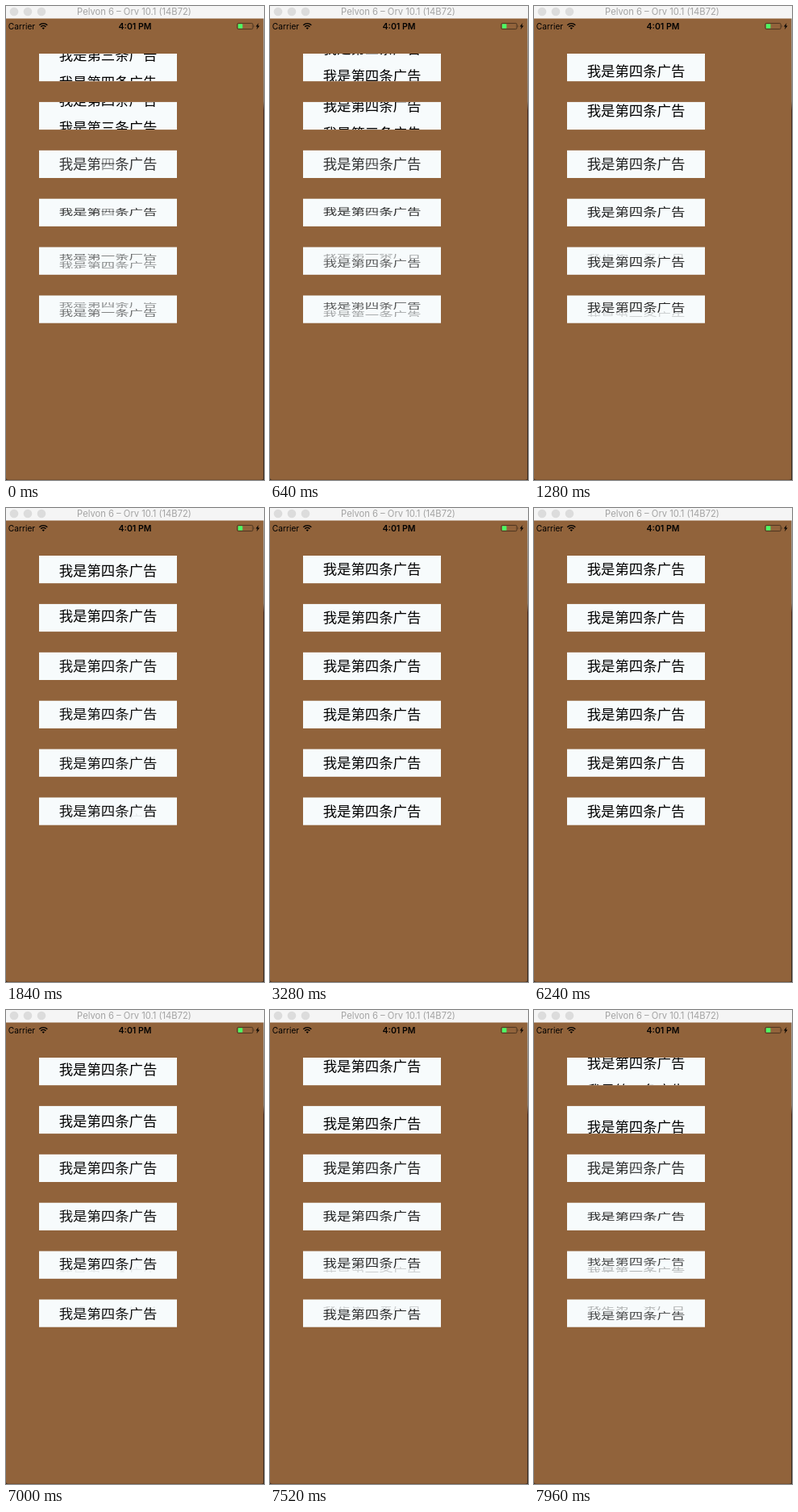
These frames come from a looping animation (320x587 px, 8 s). An HTML page:

```html
<!DOCTYPE html>
<html lang="zh-CN">
<head>
<meta charset="utf-8">
<title>滚动广告</title>
<style>
  html, body { margin: 0; width: 100%; height: 100%; overflow: hidden; background: #91633b; }
  svg { display: block; width: 320px; height: 587px; }
  text { text-anchor: middle; font-family: Inter, Roboto, sans-serif; }
  .ad text { font: 17.4px "Noto Sans CJK SC", "Noto Sans CJK", sans-serif; }
</style>
</head>
<body>
<svg id="stage" viewBox="0 0 320 587" xmlns="http://www.w3.org/2000/svg">
  <defs>
    <linearGradient id="edge" x2="0" y2="1">
      <stop offset="0" stop-color="#aaa49c"/>
      <stop offset=".18" stop-color="#8a7a6c"/>
      <stop offset=".2" stop-color="#4a2c20"/>
      <stop offset="1" stop-color="#3c2a1e"/>
    </linearGradient>
  </defs>
  <rect width="320" height="587" fill="#91633b"/>
  <rect x="319" y="15" width="1" height="572" fill="url(#edge)"/>
  <rect y="586" width="320" height="1" fill="#7d5431"/>
  <path d="M0 584q0 3 3 3H0zM320 583q0 4-4 4h4z" fill="#3c2a1e"/>

  <rect width="320" height="15.5" fill="#f5f5f5"/>
  <g fill="#dcdcdc">
    <circle cx="10" cy="7" r="5.3"/><circle cx="27" cy="7" r="5.3"/><circle cx="44" cy="7" r="5.3"/>
  </g>
  <text x="159" y="11" font-size="11.2" fill="#a3a3a3">Pelvon 6 – Orv 10.1 (14B72)</text>

  <text x="19.5" y="28.7" font-size="10.2">Carrier</text>
  <g fill="none" stroke="#000" stroke-width="1.4">
    <path d="M41.3 23.7a7 7 0 0 1 10 0M43.2 25.8a4.4 4.4 0 0 1 6.2 0"/>
    <path d="M46.3 29l-1.6-1.8a2.3 2.3 0 0 1 3.2 0z" fill="#000" stroke="none"/>
  </g>
  <text x="160" y="28.7" font-size="10.5" font-weight="600">4:01 PM</text>
  <rect x="286.9" y="21.4" width="19.2" height="7.2" rx="1.4" fill="none" stroke="#3a2819" stroke-width=".8"/>
  <rect x="287.8" y="22.2" width="5.6" height="5.6" rx=".5" fill="#4cf964"/>
  <path d="M307 23.6q1.3 1.4 0 2.8z" fill="#3a2819"/>
  <path d="M313.4 21l-3.6 4.6h2.1l-1.2 3.6 3.8-4.8h-2.2z"/>
</svg>
<script>
const LOOP = 8000, SPAN = 5000, FIRST = -2320, SECOND = 6120;
const SLIDE = 34, FOLD = 11.5;
const stage = document.getElementById('stage');

function add(parent, name, attrs) {
  const el = document.createElementNS('http://www.w3.org/2000/svg', name);
  for (const key in attrs) el.setAttribute(key, attrs[key]);
  return parent.appendChild(el);
}

// Ease-in-out, the curve cubic-bezier(.42, 0, .58, 1)
function ease(x) {
  if (x <= 0) return 0;
  if (x >= 1) return 1;
  let lo = 0, hi = 1, u;
  for (let i = 0; i < 24; i++) {
    u = (lo + hi) / 2;
    const at = 1.26 * u * (1 - u) ** 2 + 1.74 * u * u * (1 - u) + u ** 3;
    if (at < x) lo = u; else hi = u;
  }
  return u * u * (3 - 2 * u);
}

const squash = p => 1 - .42 * Math.sin(Math.PI * p);

// Each effect gives [offset, height, opacity] for the leaving and the entering text
const move = (dist, height, fades) => p => [
  [-dist * p, height(p), fades ? 1 - p : 1],
  [dist * (1 - p), height(p), fades ? p : 1]
];
const full = () => 1;

const rows = [
  ['三', move(SLIDE, full, false), 17],
  ['三', move(-SLIDE, full, false), 17],
  ['一', move(0, full, true), 17],
  ['一', move(0, squash, true), 17],
  ['一', move(FOLD, squash, true), 9],
  ['一', move(-FOLD, squash, true), 9]
].map(([first, effect, reach], i) => {
  const box = { x: 41, y: 59 + 59.9 * i, width: 171, height: 34.2 };
  const mid = 75.1 + 60 * i;
  add(stage, 'rect', { ...box, fill: '#f7fbfc' });
  const clip = add(stage, 'clipPath', { id: 'clip' + i });
  add(clip, 'rect', { ...box, y: mid + 1 - reach, height: 2 * reach });
  const group = add(stage, 'g', { class: 'ad', 'clip-path': `url(#clip${i})` });
  const labels = [0, 1].map(() => add(group, 'text', { y: 6.6 }));
  return { first, effect, labels, mid };
});

function draw(t) {
  const second = t >= SECOND;
  const p = ease((t - (second ? SECOND : FIRST)) / SPAN);
  for (const { first, effect, labels, mid } of rows) {
    const words = second ? ['四', '一'] : [first, '四'];
    effect(p).forEach(([dy, height, alpha], i) => {
      const label = labels[i];
      label.textContent = `我是第${words[i]}条广告`;
      label.setAttribute('transform', `translate(126.5 ${mid + dy}) scale(1 ${height})`);
      label.setAttribute('opacity', alpha);
    });
  }
}

const start = performance.now();
function tick(now) {
  draw(Math.max(0, now - start) % LOOP);
  requestAnimationFrame(tick);
}
draw(0);
requestAnimationFrame(tick);
</script>
</body>
</html>
```
